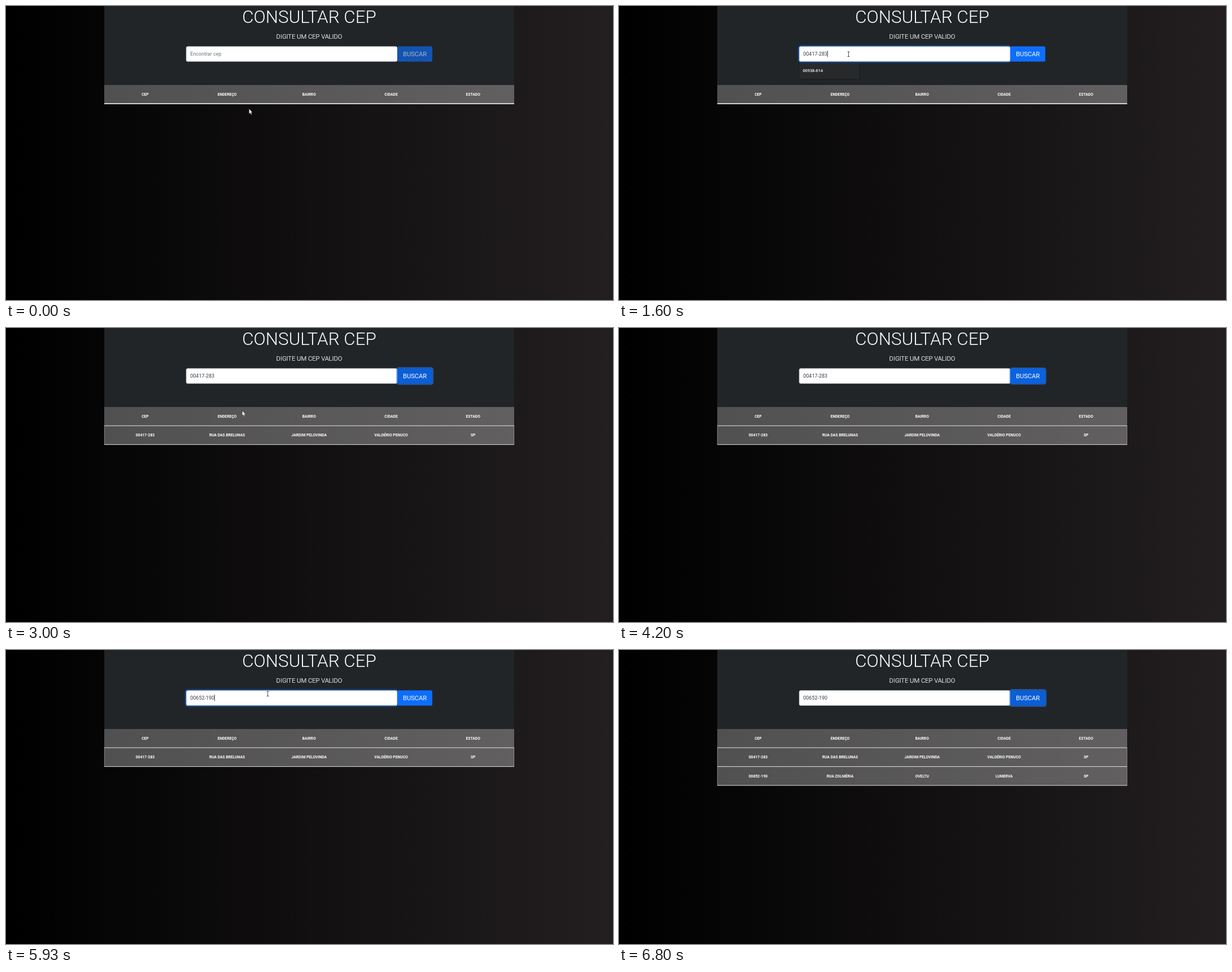
These frames come from a looping animation (1075 px wide and 521 px high, 8 s). An HTML page:

```html
<!DOCTYPE html>
<html lang="pt-BR">
<head>
<meta charset="utf-8">
<title>Consultar CEP</title>
<style>
html, body { margin: 0; width: 100%; height: 100%; overflow: hidden; background: #000; }
svg { display: block; width: 100%; height: 100%; }
text { font-family: Roboto, sans-serif; fill: #fff; }
.mid { text-anchor: middle; }
.light { font-weight: 300; }
.lead { font-size: 11.2px; stroke: #fff; stroke-width: .2px; }
.cell { font-size: 6.72px; font-weight: 700; text-anchor: middle; }
.field { font-size: 8.96px; }
</style>
</head>
<body>
<svg viewBox="0 0 1075 521">
  <defs>
    <linearGradient id="page"><stop stop-color="#000"/><stop offset="1" stop-color="#231f20"/></linearGradient>
  </defs>
  <rect width="1075" height="521" fill="url(#page)"/>
  <rect x="174" width="726" height="140" fill="#212528"/>
  <text class="mid light" x="537" y="30.3" font-size="31.36">CONSULTAR CEP</text>
  <text class="mid light lead" x="537" y="58.3">DIGITE UM CEP VALIDO</text>

  <rect id="table" x="174" y="140" width="726" fill="#fff" fill-opacity=".3"/>
  <g id="rows" stroke-width="1"></g>
  <path id="sides" stroke="#aaa" stroke-width=".6"/>

  <rect id="inputRing" fill="#0d6efd"/>
  <rect id="input" x="319.2" y="71.8" width="373.6" height="26.5" rx="2.6" fill="#fff" stroke-width=".6"/>
  <rect id="selection" x="326.3" y="79.5" width="43" height="11" fill="#1967d2"/>
  <text id="value" class="field" x="326.3" y="88.1"></text>
  <rect id="caret" y="79" width=".8" height="11.5" fill="#222"/>

  <g id="button">
    <rect id="buttonRing" fill="#3184fd"/>
    <rect id="face" x="693.2" y="71.6" width="61.8" height="27" rx="2.7"/>
    <text class="mid" x="724.1" y="89.4" font-size="11.2">BUSCAR</text>
  </g>

  <g id="dropdown">
    <rect x="318" y="101" width="109" height="29.5" rx="2" fill="#000" opacity=".2"/>
    <rect x="319" y="101" width="106.5" height="28" rx="1" fill="#27292b"/>
    <text x="325.4" y="117.2" font-size="7.3" font-weight="600" style="font-family:'Open Sans',sans-serif">00938-614</text>
  </g>
  <path id="cursor" stroke-linejoin="round"/>
</svg>
<script>
const $ = id => document.getElementById(id);
const set = (id, attrs) => { for (const k in attrs) $(id).setAttribute(k, attrs[k]); };
const show = (id, on) => set(id, { visibility: on ? 'visible' : 'hidden' });

// All times below are ticks of 1/15 s
const LOOP = 8000, FPS = 15, FADE = .15 * FPS, BLINK = .5 * FPS;
const FOCUS = 14.5, PASTE = 23, HOVER = 33.5, CLICK = 37.4, FOUND = 41, LEAVE = 62.3;
const REFOCUS = 83, SELECT = 84, REPASTE = 87.5, REHOVER = 91.5, RECLICK = 96.4, REFOUND = 102;

const FIRST = '00417-283', SECOND = '00652-190';
const ROWS = [
  ['CEP', 'ENDEREÇO', 'BAIRRO', 'CIDADE', 'ESTADO'],
  [FIRST, 'RUA DAS BRELUNAS', 'JARDIM PELOVINDA', 'VALDÉRIO PENUCO', 'SP'],
  [SECOND, 'RUA ZOLMÉRIA', 'OVELTU', 'LUMERVA', 'SP']
];
const rowBottom = r => 173.2 + r * 33.4;

ROWS.forEach((row, r) => {
  const cells = row.map((word, c) =>
    `<text class="cell" x="${246.4 + c * 145.2}" y="${rowBottom(r) - 14.4}">${word}</text>`);
  $('rows').innerHTML +=
    `<g id="row${r}">${cells.join('')}<path stroke="#e4e4e4" d="M174 ${rowBottom(r)}H900"/></g>`;
});

// Pointer runs: eased moves between [tick, x, y] stops; hidden outside them
const RUNS = [
  [[0, 430.4, 182], [3, 430.4, 181.6], [9, 404, 88], [11, 406.5, 85.3], [25, 406.5, 85.3],
   [32, 781.5, 108], [35, 740.6, 85], [43, 740.6, 85], [46, 305.5, 168]],
  [[72, 65.5, 48], [81, 372, 82], [83, 354, 81.5], [86, 206.5, 80], [92, 720.7, 75], [100, 720.7, 75]]
];
const SHAPES = {
  arrow: ['M0 0V9.2L2.1 7.3 3.6 10.7 5 10.1 3.6 6.8H6.2Z', '#fff', '#111', .5],
  beam: ['M-2-4.2H2M0-4.2V4.2M-2 4.2H2', 'none', '#222', .8],
  hand: ['M-1 1Q0-1 1 1V4.7L5.6 6V9L4.6 12.4H0L-3 8-1 8Z', '#fff', '#222', .5]
};

const clamp = v => Math.max(0, Math.min(1, v));
const mix = (a, b, p) => a + (b - a) * p;
const ease = p => p * p * (3 - 2 * p);
const fade = (n, start) => ease(clamp((n - start) / FADE));
const pulse = (n, on, off) => fade(n, on) - fade(n, off);
const blend = (a, b, p) => `rgb(${a.map((v, i) => Math.round(mix(v, b[i], p)))})`;
const within = (n, a, b) => n >= a && n < b;

function ring(id, x, y, w, h, p, alpha) {
  const s = 2.24 * p;
  set(id, { x: x - s, y: y - s, width: w + 2 * s, height: h + 2 * s, rx: 2.7 + s, opacity: p ? alpha : 0 });
}

function drawPointer(n) {
  const run = RUNS.find(r => n >= r[0][0] && n <= r[r.length - 1][0]);
  show('cursor', run);
  if (!run) return;
  const i = Math.max(1, run.findIndex(stop => stop[0] >= n));
  const [a, b] = [run[i - 1], run[i]];
  const p = ease((n - a[0]) / (b[0] - a[0]));
  const x = mix(a[1], b[1], p), y = mix(a[2], b[2], p);
  const inBar = y > 71 && y < 99;
  const kind = within(n, REFOCUS, REPASTE) || inBar && within(x, 319, 693) ? 'beam'
    : inBar && within(x, 693, 756) ? 'hand' : 'arrow';
  const [d, fill, stroke, width] = SHAPES[kind];
  set('cursor', { d, fill, stroke, 'stroke-width': width, transform: `translate(${x} ${y})` });
}

function drawInput(n) {
  const focus = pulse(n, FOCUS, CLICK) + pulse(n, REFOCUS, RECLICK);
  ring('inputRing', 319, 71.5, 374, 27, focus, .4 * focus);
  set('input', { stroke: blend([206, 212, 218], [134, 183, 254], focus) });

  const filled = n >= PASTE, selected = within(n, SELECT, REPASTE);
  $('value').textContent = n >= REPASTE ? SECOND : filled ? FIRST : 'Encontrar cep';
  $('value').style.fill = selected ? '#fff' : filled ? '#383c40' : '#6c757d';
  show('selection', selected);

  // The blink restarts at each focus and paste
  const since = [REPASTE, REFOCUS, PASTE, FOCUS].find(t => n >= t);
  const active = within(n, FOCUS, CLICK) || within(n, REFOCUS, RECLICK);
  set('caret', { x: filled ? 369 : 326.2 });
  show('caret', active && !selected && (n - since) % (2 * BLINK) < BLINK);
  set('dropdown', { opacity: n > FOCUS + 1 ? 1 - fade(n, PASTE + 1.5) : 0 });
}

function drawButton(n) {
  const focus = pulse(n, CLICK, LEAVE) + fade(n, RECLICK);
  const hover = pulse(n, HOVER, LEAVE) + fade(n, REHOVER);
  const press = pulse(n, CLICK - 1, CLICK + 2) + pulse(n, RECLICK - 1, RECLICK + 2);
  ring('buttonRing', 693.2, 71.6, 61.8, 27, focus, .5);
  set('face', { fill: blend([13, 110, 253], [11, 94, 215], hover + press * .35) });
  set('button', { opacity: n < PASTE ? .65 : 1 });
}

function drawTable(n) {
  const last = (n >= FOUND) + (n >= REFOUND);
  const bottom = rowBottom(last);
  set('table', { height: bottom - 140 });
  set('sides', { d: last ? `M174.3 ${rowBottom(0)}V${bottom}M899.7 ${rowBottom(0)}V${bottom}` : '' });
  set('rows', { 'stroke-width': last ? 1 : 1.7 });
  ROWS.forEach((_, r) => show('row' + r, r <= last));
}

function draw(now) {
  const n = Math.floor((now % LOOP + 4) * FPS / 1000) % (LOOP * FPS / 1000);
  drawTable(n);
  drawInput(n);
  drawButton(n);
  drawPointer(n);
  requestAnimationFrame(draw);
}
draw(0);
</script>
</body>
</html>
```
